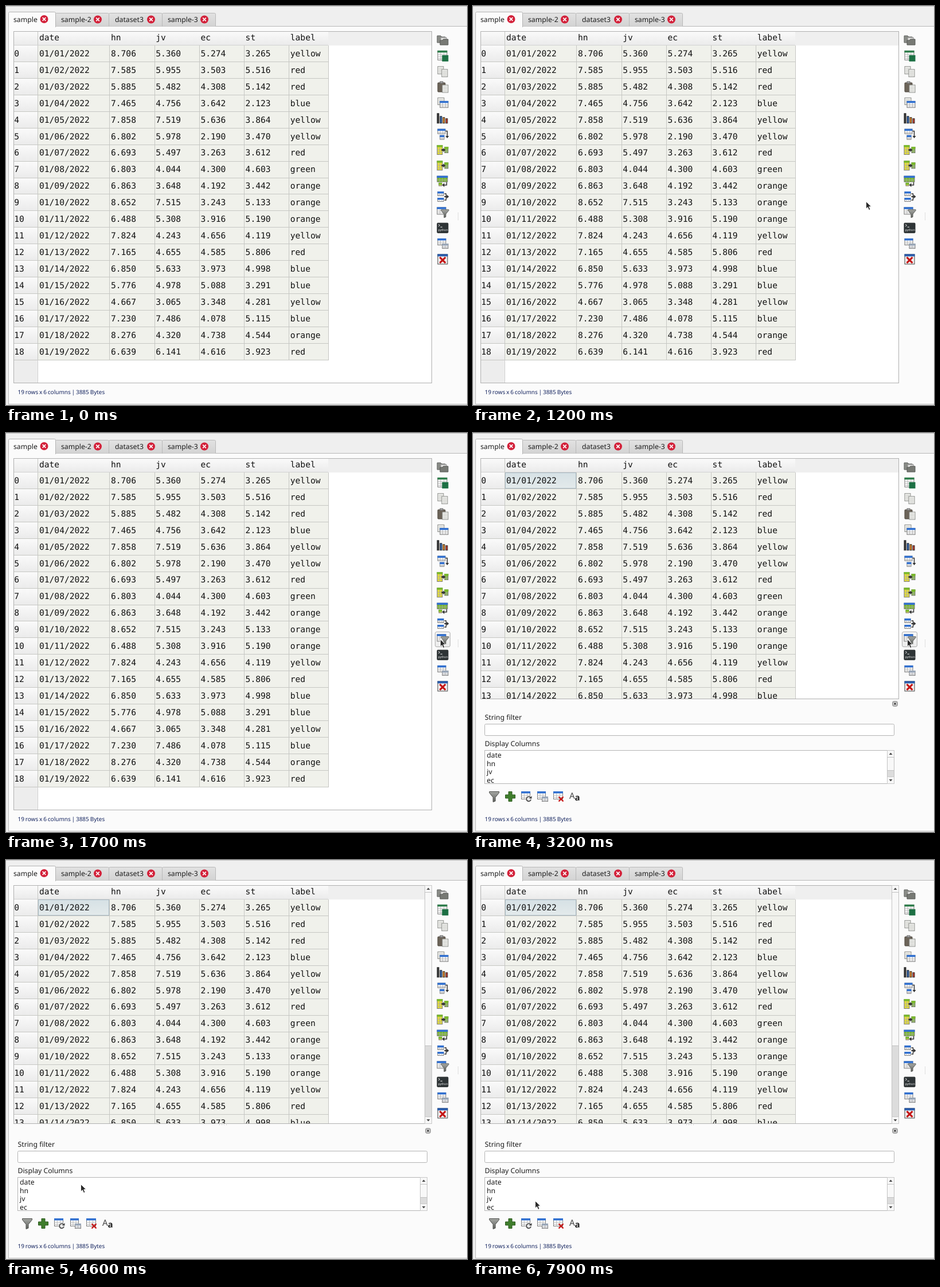
Write an HTML page that moves like this. It is 804 by 697 pixels and loops after 8 s.

```html
<!DOCTYPE html>
<html lang="en">
<head>
<meta charset="utf-8">
<title>Table filter</title>
<style>
html, body { margin: 0; width: 100%; height: 100%; overflow: hidden; background: #efefef; }
svg { display: block; width: 804px; height: 697px; text-rendering: geometricPrecision; }
text { font-family: "Noto Sans", sans-serif; font-size: 12.25px; fill: #1c1c1c; white-space: pre; }
.mono text { font-family: "DejaVu Sans Mono", monospace; font-size: 14.6px; fill: #111; }
</style>
</head>
<body>
<svg id="stage" viewBox="0 0 804 697" xmlns="http://www.w3.org/2000/svg"></svg>
<script>
const COLS = ['date', 'hn', 'jv', 'ec', 'st', 'label'];
const EDGES = [55, 180, 259, 337, 415, 493, 562];
const ROWS = `8.706 5.360 5.274 3.265 yellow
7.585 5.955 3.503 5.516 red
5.885 5.482 4.308 5.142 red
7.465 4.756 3.642 2.123 blue
7.858 7.519 5.636 3.864 yellow
6.802 5.978 2.190 3.470 yellow
6.693 5.497 3.263 3.612 red
6.803 4.044 4.300 4.603 green
6.863 3.648 4.192 3.442 orange
8.652 7.515 3.243 5.133 orange
6.488 5.308 3.916 5.190 orange
7.824 4.243 4.656 4.119 yellow
7.165 4.655 4.585 5.806 red
6.850 5.633 3.973 4.998 blue
5.776 4.978 5.088 3.291 blue
4.667 3.065 3.348 4.281 yellow
7.230 7.486 4.078 5.115 blue
8.276 4.320 4.738 4.544 orange
6.639 6.141 4.616 3.923 red`.split('\n').map(r => r.split(' '));
const TOP = 69, PITCH = 28.94;
const textX = i => i ? 183 + (i - 1) * 78.2 : 58;
const rowY = i => Math.round(TOP + i * PITCH);
const BLUE = '#2f6fd0', GREEN = '#78b82a', YELLOW = '#e3dc3a', RED = '#c41616';

const rect = (x, y, w, h, fill, stroke = 'none', rx = 0) => {
  const o = stroke === 'none' ? 0 : .5;
  return `<rect x="${x + o}" y="${y + o}" width="${w - 2 * o}" height="${h - 2 * o}" rx="${rx}" fill="${fill}" stroke="${stroke}"/>`;
};
const path = (d, fill = 'none', stroke = 'none', w = 1) =>
  `<path d="${d}" fill="${fill}" stroke="${stroke}" stroke-width="${w}"/>`;
const text = (x, y, s, extra = '') => `<text x="${x}" y="${y}" ${extra}>${s}</text>`;
const at = (x, y, s) => `<g transform="translate(${x} ${y})">${s}</g>`;
const range = (n, f) => Array.from({ length: n }, (_, i) => f(i)).join('');

function tabs() {
  const list = [['sample-2', 86, 180, 96, 160], ['dataset3', 180, 273, 190, 253], ['sample-3', 273, 366, 282, 346]];
  const close = (x, y) => `<circle cx="${x}" cy="${y}" r="7" fill="#d3213a"/>` +
    path(`M${x - 2.8} ${y - 2.8}l5.6 5.6m0-5.6l-5.6 5.6`, 'none', '#fff', 1.7);
  return list.map(([s, a, b, tx, cx]) =>
    path(`M${a - .5} 35.5V14.5q0-2 2-2H${b - 2.5}q2 0 2 2V35.5`, 'url(#tab)', '#b9b9b9') +
    text(tx, 28, s) + close(cx, 23.5)).join('') +
    path('M4.5 37V12.5q0-2 2-2H84.5q2 0 2 2V37', '#fbfbfb', '#b4b4b4') +
    rect(5, 35, 81, 3, '#fbfbfb') + text(13, 27.5, 'sample') + close(66.5, 23);
}

function grid() {
  const bottom = rowY(ROWS.length) - 1;
  let s = rect(14, 45, 728, 620, '#fff') + rect(14, 45, 728, 24, '#efefef') +
    rect(14, 45, 548, 23, 'url(#head)') + rect(14, TOP, 41, 620, '#ededed') +
    rect(56, TOP, 506, bottom - TOP, '#f0f1eb');
  s += ROWS.map((_, i) => rect(14, rowY(i), 41, rowY(i + 1) - rowY(i) - 1, 'url(#head)') +
    rect(14, rowY(i + 1) - 1, 548, 1, '#c6c7c3')).join('');
  s += EDGES.map((x, i) => rect(x, i ? TOP : 45, 1, bottom - (i ? TOP : 45) + 1, '#c6c7c3')).join('');
  s += rect(14, 68, 548, 1, '#d2d2d2') + rect(55, bottom, 1, 60, '#cfcfcf');
  s += '<g id="pick">' + rect(56, TOP, 124, 28, 'url(#sel)', '#a9bac4') + '</g>';
  s += '<g class="mono">' + COLS.map((c, i) => text(textX(i), 60, c)).join('') +
    ROWS.map((r, i) => {
      const y = TOP + 18.8 + i * PITCH;
      const day = `01/${String(i + 1).padStart(2, '0')}/2022`;
      return text(14.2, y, i) + [day, ...r].map((v, k) => text(textX(k), y, v)).join('');
    }).join('') + '</g>';
  return s;
}

function scrollbar(x, y, h, thumbTop, thumbEnd) {
  const m = x + 6.5, e = y + h;
  return rect(x, y, 13, h, '#dcdcdc', '#c2c2c2') +
    rect(x, y, 13, 13, '#f7f7f7', '#c8c8c8') + rect(x, e - 13, 13, 13, '#f7f7f7', '#c8c8c8') +
    rect(x, thumbTop, 13, thumbEnd - thumbTop, '#f8f8f8', '#c2c2c2') +
    path(`M${m - 3} ${y + 8}h6l-3-3.5z`, '#444') + path(`M${m - 3} ${e - 8}h6l-3 3.5z`, '#444');
}

// small spreadsheet glyph with a coloured heading
function sheet(x, y, w, h, head = BLUE, body = '#fff', cols = 3, rows = 3) {
  const hh = 3.5, ch = (h - hh) / rows;
  let d = '';
  for (let i = 1; i < cols; i++) d += `M${x + w * i / cols} ${y + hh}V${y + h}`;
  for (let i = 1; i < rows; i++) d += `M${x} ${y + hh + ch * i}h${w}`;
  return rect(x, y, w, h, body, '#777') + path(d, 'none', '#aaa', .8) + rect(x, y, w, hh, head);
}
const page = (x, y, w = 11, h = 14) => rect(x, y, w, h, '#f4f4f2', '#888a85') +
  path(`M${x + 2} ${y + 3.5}h${w - 4}m0 2.5h${4 - w}m0 2.5h${w - 4}m0 2.5h${4 - w}`, 'none', '#babdb6', .9);
const funnel = (x, y, k = 1) => `<g transform="translate(${x} ${y}) scale(${k})">` +
  path('M-8.5 -8.5H8.5V-6.5L2 1.5V8L-2 9.5V1.5L-8.5 -6.5Z', 'url(#metal)', '#4a4c49') + '</g>';
const cross = (x, y, r, w = 2.4) => path(`M${x - r} ${y - r}l${2 * r} ${2 * r}m0 ${-2 * r}l${-2 * r} ${2 * r}`, 'none', RED, w);
const arrow = (x, y) => path(`M${x} ${y}h4v-2.5l4 3.5l-4 3.5v-2.5h-4z`, '#333');
const pair = sheet(-10, -8, 10, 17, GREEN, YELLOW, 2, 3) + sheet(3, -5, 7, 11, GREEN, GREEN, 2, 3) +
  path('M-2 -1h3v-2l4 3.5l-4 3.5v-2h-3z', '#333');
const bar = (x, h, fill) => rect(x, 9 - h, 4, h, fill, '#2b2b2b');

const ICONS = [
  path('M-9.5 -7.5h6l2 2h6v10h-14z', '#8a8c87', '#5f615e') + rect(-4, -5, 11, 9, '#dededc', '#888') +
    path('M-4.5 8.5V0.5h4l2-2h8v10z', '#777974', '#555753'),
  sheet(-9, -9, 17, 17, '#2e7d4b', '#fff', 3, 4) + rect(-1, -1, 11, 11, '#1d7044'),
  page(-9, -9) + page(-2, -4),
  rect(-9, -8, 14, 17, '#6c6459', '#4c463d', 1) + rect(-5, -10, 6, 4, '#aaa', '#666') + page(-1, -4),
  page(-9, -9, 12, 13) + sheet(-5, -3, 15, 12),
  bar(-10, 18, '#333') + bar(-5, 13, '#245fb5') + bar(0, 11, '#ef8b1f') + bar(5, 9, '#c4382b'),
  sheet(-9, -9, 14, 9, BLUE, '#fff', 3, 2) + sheet(-5, 2, 8, 8, BLUE, '#fff', 2, 2) +
    path('M5 -5H8V4', 'none', '#333', 1.5) + path('M5 3.5h6l-3 4z', '#333'),
  pair,
  pair,
  sheet(-10, -9, 19, 11, BLUE, GREEN, 4, 2) + path('M7 2v5h-5', 'none', '#333', 1.5) +
    path('M3 3.5v7l-4-3.5z', '#333') + sheet(-7, 3, 6, 6, GREEN, YELLOW, 2, 1),
  sheet(-9, -9, 11, 8, BLUE, '#fff', 3, 2) + sheet(-9, 2, 11, 7, BLUE, '#fff', 3, 1) +
    path('M3 -5h3V6h-3', 'none', '#333', 1.3) + arrow(3, -1),
  sheet(-10, -9, 16, 13) + funnel(4, 2, .78),
  rect(-10, -9, 20, 18, '#2e3436', '#1c2022', 1) + path('M-7.5 -6.5l2.5 2l-2.5 2M-4 -1.5h3.5', 'none', '#eee', 1) +
    text(-8, 5.5, 'python', 'style="font-size:5.2px;fill:#eee"'),
  sheet(-9, -9, 15, 12) + sheet(-1, 0, 11, 9, '#9aa7b8', '#e8eaee', 2, 2),
  rect(-9, -9, 18, 18, '#f2f2f2', '#444') + rect(-9, -9, 18, 4, '#2a5cab') + cross(0, 1.5, 5, 3.2)
];

function filterPane() {
  const row = [
    funnel(0, 0),
    path('M-3 -8.5h6v5.5h5.5v6H3v5.5h-6V3h-5.5v-6H-3z', '#3f7d2c', '#2c5a1e'),
    sheet(-9, -9, 16, 14) + '<circle cx="4" cy="4" r="5.5" fill="#e8e8e8"/>' +
      path('M7.5 2a4 4 0 1 0 .5 3.5', 'none', '#444', 1.7) + path('M9.5 -1v4.5H5z', '#444'),
    sheet(-9, -9, 15, 14) + sheet(-1, 0, 11, 9, '#9aa7b8', '#e8eaee', 2, 2),
    sheet(-9, -9, 17, 14) + cross(4.5, 4.5, 4)
  ];
  return rect(13, 466, 730, 194, '#fbfbfb') +
    rect(731.5, 468.5, 9, 9, '#f5f5f5', '#555', 1.5) + path('M734 471l4 4m0-4l-4 4', 'none', '#333', 1.3) +
    text(20.5, 500.5, 'String filter') + rect(20, 508, 715, 21, '#fff', '#b4b4b4', 2) +
    text(20.5, 546.5, 'Display Columns') + rect(20, 554, 715, 59, '#fff', '#b4b4b4') +
    COLS.slice(0, 4).map((c, i) => text(24, 567 + i * 14.6, c)).join('') +
    scrollbar(722, 554, 59, 566, 590) +
    row.map((s, i) => at(37 + 28 * i, 635, s)).join('') +
    text(168, 638.5, 'A', 'style="font-size:15px;fill:#444"') +
    text(177.5, 641.5, 'a', 'style="font-size:15px;font-weight:700;fill:#222"');
}

const grad = (id, a, b) => `<linearGradient id="${id}" x2="0" y2="1"><stop stop-color="${a}"/><stop offset="1" stop-color="${b}"/></linearGradient>`;
const stage = document.getElementById('stage');
stage.innerHTML = `<defs>${grad('tab', '#e2e2e2', '#d3d3d3')}${grad('head', '#fafafa', '#ebebeb')}
${grad('sel', '#d6e1e5', '#e3eaeb')}${grad('metal', '#a5a7a3', '#5f615e')}
<clipPath id="clip"><rect id="clipBox" x="14" y="45" width="728"/></clipPath></defs>` +
  rect(0, 0, 804, 697, '#efefef') + rect(0, 0, 804, 1, '#c4c4c4') +
  rect(4, 35, 810, 661, '#fbfbfb', '#b9b9b9') + tabs() +
  '<g id="filter">' + filterPane() + '</g>' +
  '<rect id="frame" x="13.5" y="44.5" width="729" fill="#fff" stroke="#b0b0b0"/>' +
  '<g clip-path="url(#clip)">' + grid() + '</g>' +
  '<g id="bar">' + scrollbar(730, 44, 417, 56, 325) +
  range(4, i => rect(372 + i * 4, 462, 1, 1, '#bbb')) + '</g>' +
  text(20.5, 678, '19 rows x 6 columns | 3885 Bytes', 'style="font-size:10px;word-spacing:-.75px;fill:#14245f"') +
  '<g id="hover">' + rect(748, 347, 27, 27, 'url(#head)', '#aeaeae', 2.5) + '</g>' +
  ICONS.map((s, i) => at(761.5, 59.5 + i * 27.35, s)).join('') +
  range(7, i => rect(788, 361 + i * 2, 1, 1, '#c4c4c4')) +
  '<g id="cursor">' + path('M.5 .5V13.2L3.4 10.5L5.6 15.5L8 14.5L5.8 9.6H9.8Z', '#2a2a2a', '#fff', .9) + '</g>';

const el = id => document.getElementById(id);
const show = (id, on) => el(id).setAttribute('display', on ? 'inline' : 'none');
const easeOut = p => 1 - (1 - p) ** 2;
const smooth = p => p * p * (3 - 2 * p);

// start, end, from, to, easing: sampled every 100 ms, first and last included
const MOVES = [
  [200, 700, [78, 0], [631, 309], easeOut],
  [1200, 1700, [685, 341], [757, 360], easeOut],
  [3900, 4600, [746, 364], [130, 566], smooth],
  [7600, 7900, [124, 571], [108, 595], p => p]
];

function cursorAt(t) {
  const move = MOVES.filter(m => t >= m[0]).pop();
  if (!move) return null;
  const [start, end, a, b, ease] = move;
  const k = ease(Math.min(1, (t - start) / (end - start)));
  return a.map((v, i) => Math.round(v + (b[i] - v) * k));
}

function draw(ms) {
  const t = Math.floor(ms % 8000 / 100) * 100;
  const open = t >= 3200, scroll = t >= 3400;
  const bottom = scroll ? 461 : open ? 465 : 659;
  el('frame').setAttribute('height', bottom - 45);
  el('clipBox').setAttribute('height', bottom - 46);
  show('filter', open);
  show('pick', open);
  show('bar', scroll);
  const pos = cursorAt(t);
  show('cursor', pos);
  if (pos) el('cursor').setAttribute('transform', `translate(${pos})`);
  show('hover', pos && pos[0] >= 748 && pos[1] >= 347 && pos[1] < 374);
}

let origin;
function tick(now) {
  origin ??= now;
  draw(now - origin);
  requestAnimationFrame(tick);
}
draw(0);
requestAnimationFrame(tick);
</script>
</body>
</html>
```
